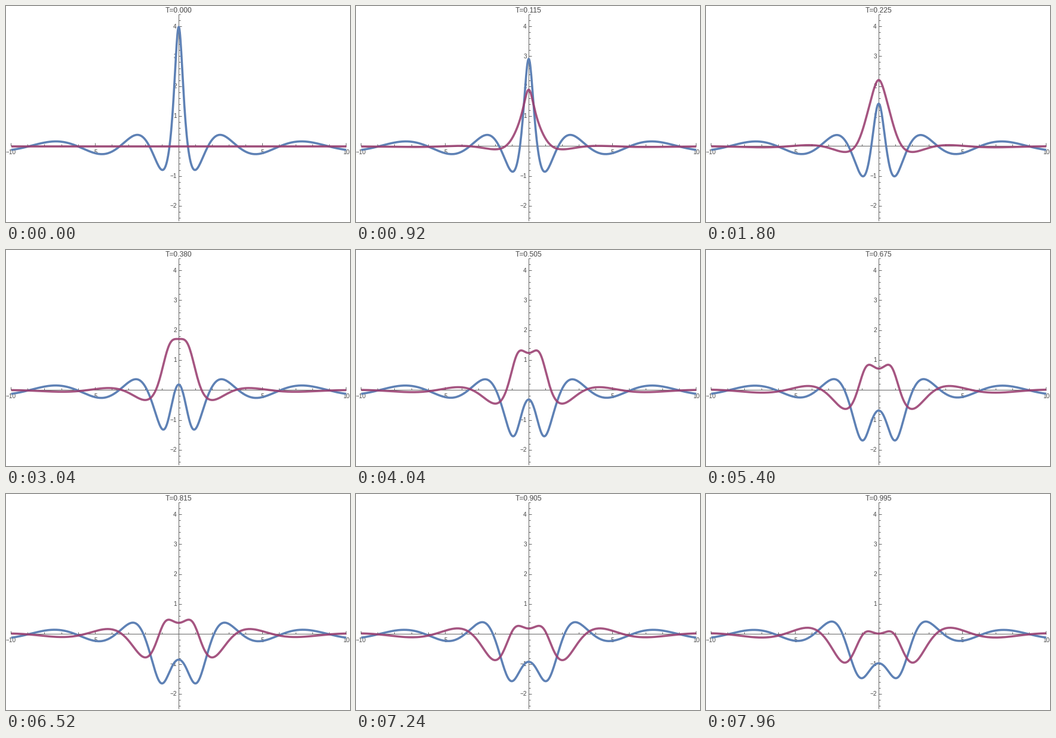
Animation of 576 by 363 pixels, one loop 8000 ms. Source, as a matplotlib script:

```python
"""Rogue wave of infinite order: real and imaginary parts of a solution of
i psi_T + psi_XX / 2 + |psi|^2 psi = 0 with psi(0, 0) = 4."""
import numpy as np
import matplotlib.pyplot as plt
from matplotlib.animation import FuncAnimation

W, H, DPI = 576, 363, 64
PX = 72 / DPI                      # one pixel in points
CX, CY = 289.2, 236.4              # origin of the curves in pixels
AX, AY = 288.9, 235.3              # origin of the axes, snapped to whole pixels
SX, SY = 28.05, 50.3               # pixels per unit
FRAMES, DT = 200, 0.005

GRAY = "#666666"
INK = "#444444"
BLUE = "#5E81B5"
PURPLE = (0.6, 0.24, 0.44, 0.88)

# ---- wave: Riemann-Hilbert problem on a circle, solved in Laurent modes ----
MODES, SAMPLES = 48, 256
z = np.exp(2j * np.pi * np.arange(SAMPLES) / SAMPLES)
n = np.arange(MODES)
TOEPLITZ = (n[:, None] - n[None, :]) % SAMPLES


def wave(x, t):
    """psi(x, t) for an array x >= 0 at one time t."""
    r = np.sqrt(2 / np.maximum(x, 2))[:, None]
    lam = r * z
    theta = lam * x[:, None] + lam**2 * t + 2 / lam
    up = np.fft.fft(np.exp(2j * theta), axis=1) / SAMPLES
    down = np.fft.fft(np.exp(-2j * theta), axis=1) / SAMPLES
    system = np.eye(MODES) + up[:, TOEPLITZ] @ down[:, TOEPLITZ]
    c = np.linalg.solve(system, np.sqrt(2) * np.eye(MODES, 1))[..., 0]
    return np.sqrt(2) * 1j * r[:, 0] * (c * down[:, (-1 - n) % SAMPLES]).sum(axis=1)


def all_waves(x):
    """psi for every frame, interpolated in time from Chebyshev nodes."""
    count = 30
    nodes = np.cos(np.pi * (np.arange(count) + 0.5) / count)
    values = np.array([wave(x, (s + 1) / 2) for s in nodes])
    basis = np.polynomial.chebyshev.chebvander
    times = 2 * DT * np.arange(FRAMES) - 1
    weights = basis(times, count - 1) @ np.linalg.inv(basis(nodes, count - 1))
    return weights @ values


half = 10 * np.linspace(0, 1, 160) ** 1.4
psi = all_waves(half)
psi = np.hstack([psi[:, :0:-1], psi])
xs = CX + SX * np.concatenate([-half[:0:-1], half])

# ---- stage ----
plt.rcParams["font.family"] = "Liberation Sans"
fig = plt.figure(figsize=(W / DPI, H / DPI), dpi=DPI, facecolor="white")
ax = fig.add_axes([0, 0, 1, 1])
ax.set_xlim(0, W)
ax.set_ylim(H, 0)
ax.axis("off")


def segment(x0, y0, x1, y1):
    ax.plot([x0, x1], [y0, y1], color=GRAY, lw=PX, zorder=1,
            solid_capstyle="butt")


def label(x, y, value, align):
    ax.text(x, y, str(value).replace("-", "\u2212"), size=10 * PX, color=INK,
            ha=align, va="baseline", zorder=1)


segment(8, AY, 570, AY)
segment(AX, 14, AX, 361)

for i in range(-10, 11):
    if i == 0:
        continue
    x = AX + SX * i
    segment(x, AY, x, AY - (5 if i % 5 == 0 else 3))
    if i % 5 == 0:
        label(x, 249, i, "center")

for i in range(-12, 23):
    if i == 0:
        continue
    y = AY - SY * i / 5
    segment(AX, y, AX + (5 if i % 5 == 0 else 3), y)
    if i % 5 == 0:
        label(285.8, y + 3.5, i // 5, "right")

title = ax.text(289, 11, "", size=12 * PX, color=INK,
                ha="center", va="baseline")
style = dict(lw=3.6 * PX, solid_capstyle="butt", solid_joinstyle="round")
real_line, = ax.plot([], [], color=BLUE, zorder=2, **style)
imag_line, = ax.plot([], [], color=PURPLE, zorder=3, **style)


def update(k):
    real_line.set_data(xs, CY - SY * psi[k].real)
    imag_line.set_data(xs, CY - SY * psi[k].imag)
    title.set_text(f"T={k * DT:.3f}")
    return real_line, imag_line, title


anim = FuncAnimation(fig, update, frames=FRAMES, interval=40, repeat=True)
plt.show()
```
